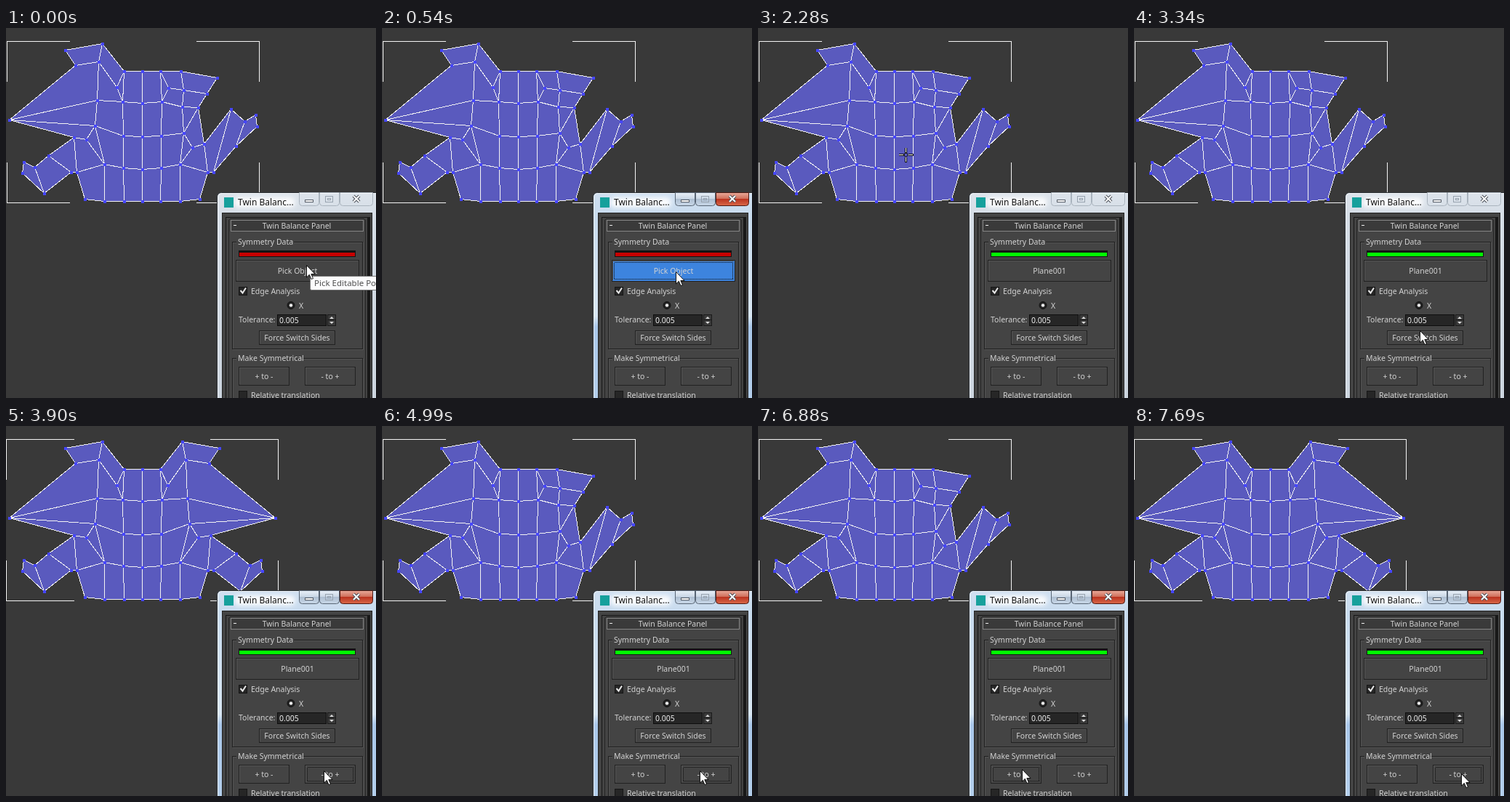
An HTML page that plays this animation: 509x509 px, repeating every 8 s.

```html
<!DOCTYPE html>
<html lang="en">
<head>
<meta charset="utf-8">
<title>Mesh symmetry demo</title>
<style>
  html, body { margin: 0; width: 100%; height: 100%; overflow: hidden; background: #393939; }
  svg { display: block; width: 100%; height: 100%; }
  text { font: 10.5px "Noto Sans", "Open Sans", sans-serif; fill: #d2d2d2; white-space: pre; }
  .mid { text-anchor: middle; }
  .title { font-size: 12px; fill: #111; }
  .tip { font-size: 11.5px; fill: #505050; }
  .value { fill: #f0f0f0; }
  .crisp, rect { shape-rendering: crispEdges; }
  .soft { shape-rendering: auto; }
  .off { display: none; }
</style>
</head>
<body>
<svg id="stage" viewBox="0 0 509 509">
  <defs>
    <linearGradient id="glass" x2="0" y2="1">
      <stop stop-color="#dce3eb"/><stop offset=".12" stop-color="#d5dde6"/><stop offset="1" stop-color="#ccd5df"/>
    </linearGradient>
    <linearGradient id="glassOn" x2="0" y2="1">
      <stop stop-color="#cfdff0"/><stop offset=".12" stop-color="#c8dbee"/><stop offset=".6" stop-color="#d9e7f4"/>
      <stop offset=".65" stop-color="#a9c7ea"/><stop offset="1" stop-color="#b4cfec"/>
    </linearGradient>
    <linearGradient id="red" x2="0" y2="1">
      <stop stop-color="#e8aa9a"/><stop offset=".45" stop-color="#d0705c"/>
      <stop offset=".5" stop-color="#bb3420"/><stop offset="1" stop-color="#d9694a"/>
    </linearGradient>
    <linearGradient id="cap" x2="0" y2="1">
      <stop stop-color="#e9f0f8"/><stop offset=".45" stop-color="#cbd8e6"/>
      <stop offset=".5" stop-color="#aebfd2"/><stop offset="1" stop-color="#c9d8e8"/>
    </linearGradient>
    <filter id="glow" x="-20%" y="-60%" width="140%" height="220%"><feGaussianBlur stdDeviation="3"/></filter>
  </defs>
</svg>
<script>
const LOOP = 8000, AXIS = 187;
const stage = document.getElementById('stage');

// ---- mesh: vertices a..y on each side, A..E along the axis
const points = s => s.split(' ').map(p => p.split(',').map(Number));
const mirror = side => side.map(([x, y]) => [2 * AXIS - x, y]);
const left = points('162,59 132,21 81,30 95,51 4,126 93,150 58,175 39,191 24,184 22,199 52,227 89,198 97,198 ' +
  '108,235 135,238 162,238 127,46 152,81 125,99 160,101 122,134 161,148 110,153 135,187 161,192');
const right = points('212,59 240,59 290,68 276,90 264,109 272,159 309,111 328,128 343,119 345,135 316,162 285,198 277,198 ' +
  '266,235 239,238 212,238 244,85 223,82 242,108 214,101 244,144 213,148 256,164 239,187 213,192');
const spine = points('187,59 187,103 187,149 187,194 187,238');
const RIM = 'AabcdefghijklmnopE';
const WIRES = 'dqb arq rt qsuxo atvyp estB euvC fwxyD uw fmx gl hk'.split(' ');

function mesh(id, a, b) {
  const at = (side, c) => c < 'a' ? spine[c.charCodeAt() - 65] : side[c.charCodeAt() - 97];
  const line = (side, s) => 'M' + [...s].map(c => at(side, c).join()).join('L');
  const rim = line(a, RIM) + 'L' + [...RIM].reverse().map(c => at(b, c).join()).join('L') + 'Z';
  const wires = [a, b].map(side => WIRES.map(w => line(side, w)).join('')).join('') + line(a, 'ABCDE');
  const all = [...a, ...b, ...spine], xs = all.map(p => p[0]), ys = all.map(p => p[1]);
  const pad = (Math.max(...xs) - Math.min(...xs)) * .01;
  const x0 = Math.round(Math.min(...xs) - pad), x1 = Math.round(Math.max(...xs) + pad);
  const y0 = Math.min(...ys) - 3, y1 = 240, w = (x1 - x0) / 4, h = (y1 - y0) / 4;
  const corner = (x, y, dx, dy) => `M${x + dx},${y}H${x}V${y + dy}`;
  const brackets = corner(x0, y0, w, h) + corner(x1, y0, -w, h) + corner(x0, y1, w, -h) + corner(x1, y1, -w, -h);
  return `<g id="${id}" class="crisp" transform="translate(.5 .5)" fill="none" stroke="#f4f4f4">
    <path d="${brackets}"/><path d="${rim}" fill="#5a5abe"/><path d="${wires}"/>
    <path stroke="none" fill="#4646ff" d="${all.map(([x, y]) => `M${x - 2},${y - 2}h4v4h-4z`).join('')}"/></g>`;
}

// ---- panel parts
const rect = (x, y, w, h, fill, more = '') => `<rect x="${x}" y="${y}" width="${w}" height="${h}" fill="${fill}" ${more}/>`;
const frame = (x, y, w, h, color, more = '') => rect(x + .5, y + .5, w - 1, h - 1, 'none', `stroke="${color}" ${more}`);
const text = (x, y, s, cls = '', more = '') => `<text x="${x}" y="${y}" class="${cls}" ${more}>${s}</text>`;
const button = (id, x, y, w, h, label, base) =>
  rect(x, y, w, h, '#444', `id="${id}Face"`) + frame(x, y, w, h, '#222') +
  `<path class="crisp" d="M${x + 1.5},${y + h - 2}V${y + 1.5}H${x + w - 2}" fill="none" stroke="#555"/>` +
  frame(x + 3, y + 3, w - 6, h - 6, '#0c0c0c', `id="${id}Focus" stroke-dasharray="1 1"`) +
  text(x + w / 2, base, label, 'mid', `id="${id}Label"`);
const group = (y, h, label, w) =>
  frame(312, y + 1, 180, h, '#555') + frame(311, y, 180, h, '#1f1f1f') +
  rect(317, y - 1, w, 4, '#444') + text(319, y + 4, label);
const check = (x, y) => rect(x, y, 12, 12, '#262626') + frame(x, y, 12, 12, '#161616');
const capButton = (x, w, fill, edge) =>
  `<path class="soft" d="M${x + .5},226.5h${w}v14q0,4 -4,4h${8 - w}q-4,0 -4,-4z" fill="${fill}" stroke="${edge}"/>`;
const caption = (id, fill, edge, closeFill, closeEdge) =>
  `<g id="${id}">${capButton(403, 27, fill, edge) + capButton(431, 27, fill, edge) + capButton(459, 45, closeFill, closeEdge)}</g>`;
const closeX = (color, width) => `<path d="M478,231l8,8m0,-8l-8,8" stroke="${color}" stroke-width="${width}"/>`;

const panel = `
  <path id="shell" d="M290.5,510V233q0,-6.500 6,-6.500H510V510Z" stroke="#2a3036"/>
  <path d="M291.500,510V234q0,-6.500 6,-6.500H510" fill="none" stroke="#fff" opacity=".7"/>
  <rect class="soft" x="314" y="233" width="84" height="14" rx="7" fill="#fff" filter="url(#glow)" opacity=".9"/>
  ${rect(300, 233, 13, 14, '#16a09c')}
  ${text(319, 244, 'Twin Balanc...', 'title')}
  ${caption('capsOff', 'none', '#aab4be', 'none', '#aab4be')}
  ${caption('capsOn', 'url(#cap)', '#596675', 'url(#red)', '#4d1a14')}
  ${rect(411, 236, 12, 4, '#fff') + frame(411, 236, 12, 4, '#555c66')}
  ${frame(439, 231, 11, 9, '#98a3af') + frame(442, 234, 5, 3, '#98a3af')}
  ${closeX('#4a4f58', 4) + closeX('#fff', 2)}
  ${rect(297, 254, 207, 256, '#444') + frame(297, 254, 207, 260, '#222')}
  ${rect(302, 260, 198, 1, '#151515') + rect(302, 260, 1, 250, '#151515') + rect(497, 260, 4, 250, '#181818')}
  ${frame(306, 262, 189, 260, '#242424', 'rx="3"')}
  ${rect(309, 264, 183, 16, '#3a3a3a') + frame(309, 264, 183, 16, '#858585')}
  ${rect(313, 271, 4, 1, '#eee') + text(400, 276, 'Twin Balance Panel', 'mid')}
  ${group(294, 148, 'Symmetry Data', 79)}
  ${rect(320, 306, 161, 9, '#141414') + rect(321, 309, 159, 5, '#c80000', 'id="status"')}
  ${button('pick', 316, 319, 170, 30, 'Pick Object', 338)}
  ${check(320, 356)}<path d="M322.500,361l3,3.500 4.500,-7" fill="none" stroke="#e8e8e8" stroke-width="2"/>
  ${text(337, 366, 'Edge Analysis')}
  <circle cx="392" cy="381.500" r="5" fill="#222" stroke="#111"/><circle cx="392" cy="381.500" r="2.300" fill="#e8e8e8"/>
  ${text(403, 386, 'X')}
  ${text(320, 405, 'Tolerance:')}
  ${rect(373, 394, 68, 16, '#262626') + frame(373, 394, 68, 16, '#0e0e0e') + text(376, 406, '0.005', 'value')}
  ${rect(442, 394, 12, 16, '#3a3a3a') + frame(442, 394, 12, 16, '#1a1a1a') + rect(442, 401, 12, 1, '#1a1a1a')}
  <path d="M445,400l3,-3 3,3zM445,404l3,3 3,-3z" fill="#ddd"/>
  ${button('force', 348, 416, 105, 20, 'Force Switch Sides', 430)}
  ${group(454, 80, 'Make Symmetrical', 90)}
  ${button('plus', 320, 466, 70, 26, '+ to -', 483)}
  ${button('minus', 411, 466, 70, 26, '- to +', 483)}
  ${check(320, 499)}${text(337, 509, 'Relative translation')}
  <g id="tooltip">
    <rect class="soft" x="418.500" y="341.500" width="130" height="19" rx="2" fill="#fcfcfd" stroke="#767676"/>
    ${text(424, 355, 'Pick Editable Poly Object', 'tip')}
  </g>`;

const pointers = `
  <path id="arrow" d="M.5,.5V17l3.800,-3.700 2.700,6.200 2.500,-1 -2.700,-6H12Z" fill="#fff" stroke="#000" stroke-width=".9"/>
  <g id="cross" class="crisp" fill="none">
    <path d="M-9.500,.5h7m6,0h7M.5,-9.500v7m0,6v7" stroke="#111" stroke-width="3"/>
    <circle class="soft" cx=".5" cy=".5" r="2.500" stroke="#111"/>
    <path d="M-9,.5h6m7,0h6M.5,-9v6m0,7v6" stroke="#fff"/>
  </g>`;

stage.insertAdjacentHTML('beforeend',
  mesh('uneven', left, right) + mesh('fromLeft', left, mirror(left)) + mesh('fromRight', mirror(right), right) +
  panel + pointers);

// ---- pointer moves: start, end, steps, target, optional curve control
const START = [413, 326];
const MOVES = [
  [80, 140, 2, [404, 335]],
  [1380, 1920, 8, [203, 174], [224.5, 241.5]],
  [2810, 3540, 11, [435, 470]],
  [3620, 3680, 2, [437, 474]],
  [5300, 5800, 8, [363, 472]],
  [7190, 7470, 5, [450, 478]],
];
function pointerAt(t) {
  let pos = START;
  for (const [t0, t1, steps, to, via] of MOVES) {
    if (t < t0) break;
    const k = Math.min(1, (Math.floor((t - t0) / (t1 - t0) * (steps - 1) + 1e-6) + 1) / steps);
    const u = k * k * (3 - 2 * k);
    pos = pos.map((p, i) => {
      const c = via ? via[i] : (p + to[i]) / 2;
      return (1 - u) ** 2 * p + 2 * u * (1 - u) * c + u * u * to[i];
    });
  }
  return pos.map(Math.round);
}

const el = id => document.getElementById(id);
const show = (id, on) => el(id).classList.toggle('off', !on);
const fill = (id, color) => el(id).setAttribute('fill', color);

function draw(t) {
  const within = (a, b) => t >= a && t < b;
  const active = within(540, 2130) || t >= 3840;
  const picked = t >= 2205;
  const state = within(3900, 4990) || t >= 7690 ? 'fromLeft' : within(5960, 6880) ? 'fromRight' : 'uneven';
  for (const id of ['uneven', 'fromLeft', 'fromRight']) show(id, id === state);

  fill('shell', active ? 'url(#glassOn)' : 'url(#glass)');
  show('capsOn', active);
  show('capsOff', !active);
  show('tooltip', t < 540);
  fill('status', t >= 2280 ? '#00ff00' : '#c80000');
  el('pickLabel').textContent = picked ? 'Plane001' : 'Pick Object';

  const pressed = {
    pick: within(540, 2205),
    plus: within(5800, 5960),
    minus: within(3840, 3900) || within(7630, 7690),
  };
  for (const id in pressed) fill(id + 'Face', pressed[id] ? '#3d84de' : '#444');
  show('pickFocus', within(540, 2130));
  show('forceFocus', false);
  show('plusFocus', within(5800, 7630));
  show('minusFocus', within(3840, 5800) || t >= 7630);

  const [x, y] = pointerAt(t);
  const cross = within(1380, 2810) && y < 236;
  show('cross', cross);
  show('arrow', !cross);
  el(cross ? 'cross' : 'arrow').setAttribute('transform', `translate(${x} ${y})`);
}

const begin = performance.now();
function tick() {
  draw((performance.now() - begin) % LOOP);
  requestAnimationFrame(tick);
}
tick();
</script>
</body>
</html>
```
